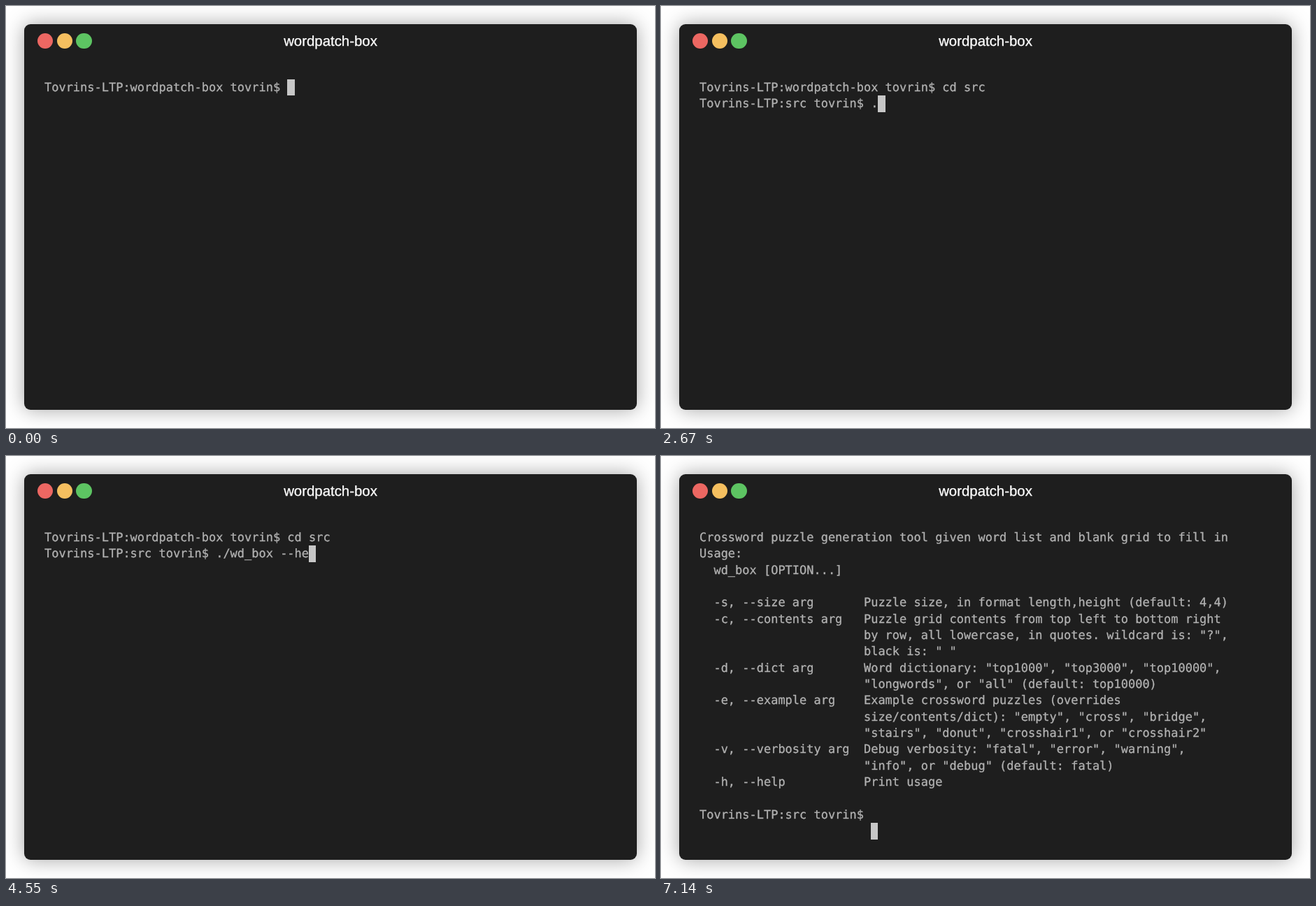
Write an HTML page that moves like this. It is 928 px wide and 604 px high and loops after 7.24 s.

```html
<!DOCTYPE html>
<html lang="en">
<head>
<meta charset="utf-8">
<title>Terminal</title>
<style>
  html, body { margin: 0; width: 100%; height: 100%; overflow: hidden; background: #fff; }
  .stage { position: relative; width: 928px; height: 604px; overflow: hidden; }
  .stage > * { position: absolute; margin: 0; text-rendering: geometricPrecision; }
  .window {
    left: 26px; top: 26px; width: 876px; height: 552px;
    border-radius: 9px; background: #1e1e1e;
    box-shadow: 0 0 29px rgba(0, 0, 0, .36);
  }
  .dot { top: 39px; width: 22.4px; height: 22.4px; border-radius: 50%; }
  .close { left: 44.8px; background: #ec6762; }
  .min { left: 72.6px; background: #f5bf5f; }
  .max { left: 100.4px; background: #5dc462; }
  .title {
    left: 0; top: 39px; width: 100%; text-align: center; color: #fff;
    font: 20.4px/24px "Liberation Sans", Arial, sans-serif;
    -webkit-text-stroke: .3px;
  }
  .screen {
    left: 55px; top: 105px; color: #b2b2b2; white-space: pre;
    font: 16.975px/23.34px "DejaVu Sans Mono", monospace;
    font-variant-ligatures: none;
  }
  .text { position: relative; top: 1px; -webkit-text-stroke: .3px; }
  .cursor {
    display: inline-block; width: 1ch; height: 23.34px;
    vertical-align: top; background: #c7c7c7;
  }
</style>
</head>
<body>
<div class="stage">
  <div class="window"></div>
  <i class="dot close"></i><i class="dot min"></i><i class="dot max"></i>
  <div class="title">wordpatch-box</div>
  <pre class="screen"><span class="text"></span><span class="cursor"></span></pre>
</div>
<script>
  const LOOP = 7240, ROWS = 19;
  const prompt = dir => `Tovrins-LTP:${dir} tovrin$ `;
  const option = (flag, ...lines) =>
    lines.map((line, i) => (i ? '' : '  ' + flag).padEnd(23) + line).join('\n');

  const help = [
    'Crossword puzzle generation tool given word list and blank grid to fill in',
    'Usage:',
    '  wd_box [OPTION...]',
    '',
    option('-s, --size arg', 'Puzzle size, in format length,height (default: 4,4)'),
    option('-c, --contents arg',
      'Puzzle grid contents from top left to bottom right',
      'by row, all lowercase, in quotes. wildcard is: "?",',
      'black is: " "'),
    option('-d, --dict arg',
      'Word dictionary: "top1000", "top3000", "top10000",',
      '"longwords", or "all" (default: top10000)'),
    option('-e, --example arg',
      'Example crossword puzzles (overrides',
      'size/contents/dict): "empty", "cross", "bridge",',
      '"stairs", "donut", "crosshair1", or "crosshair2"'),
    option('-v, --verbosity arg',
      'Debug verbosity: "fatal", "error", "warning",',
      '"info", or "debug" (default: fatal)'),
    option('-h, --help', 'Print usage'),
    '', ''
  ].join('\n');

  // Each event appends its text to the terminal at the given time.
  const events = [];
  const print = (time, text) => events.push({ time, text });
  const type = (text, times) => times.forEach((time, i) => print(time, text[i]));

  print(0, prompt('wordpatch-box'));
  type('cd src', [350, 430, 510, 610, 690, 900]);
  print(1570, '\n' + prompt('src'));
  type('./wd_box --help', [2670, 2850, 3050, 3200, 3430, 3580, 3680, 3790, 3890,
    4030, 4160, 4430, 4550, 4710, 4810]);
  print(5120, '\n');
  print(5140, help + prompt('src'));
  print(7140, '\n' + ' '.repeat(prompt('src').length));

  const out = document.querySelector('.text');
  const start = performance.now();
  let shown = 0;

  function draw() {
    const t = (performance.now() - start) % LOOP;
    const past = events.filter(e => e.time <= t);
    if (past.length !== shown) {
      shown = past.length;
      out.textContent = past.map(e => e.text).join('').split('\n').slice(-ROWS).join('\n');
    }
    requestAnimationFrame(draw);
  }
  draw();
</script>
</body>
</html>
```
